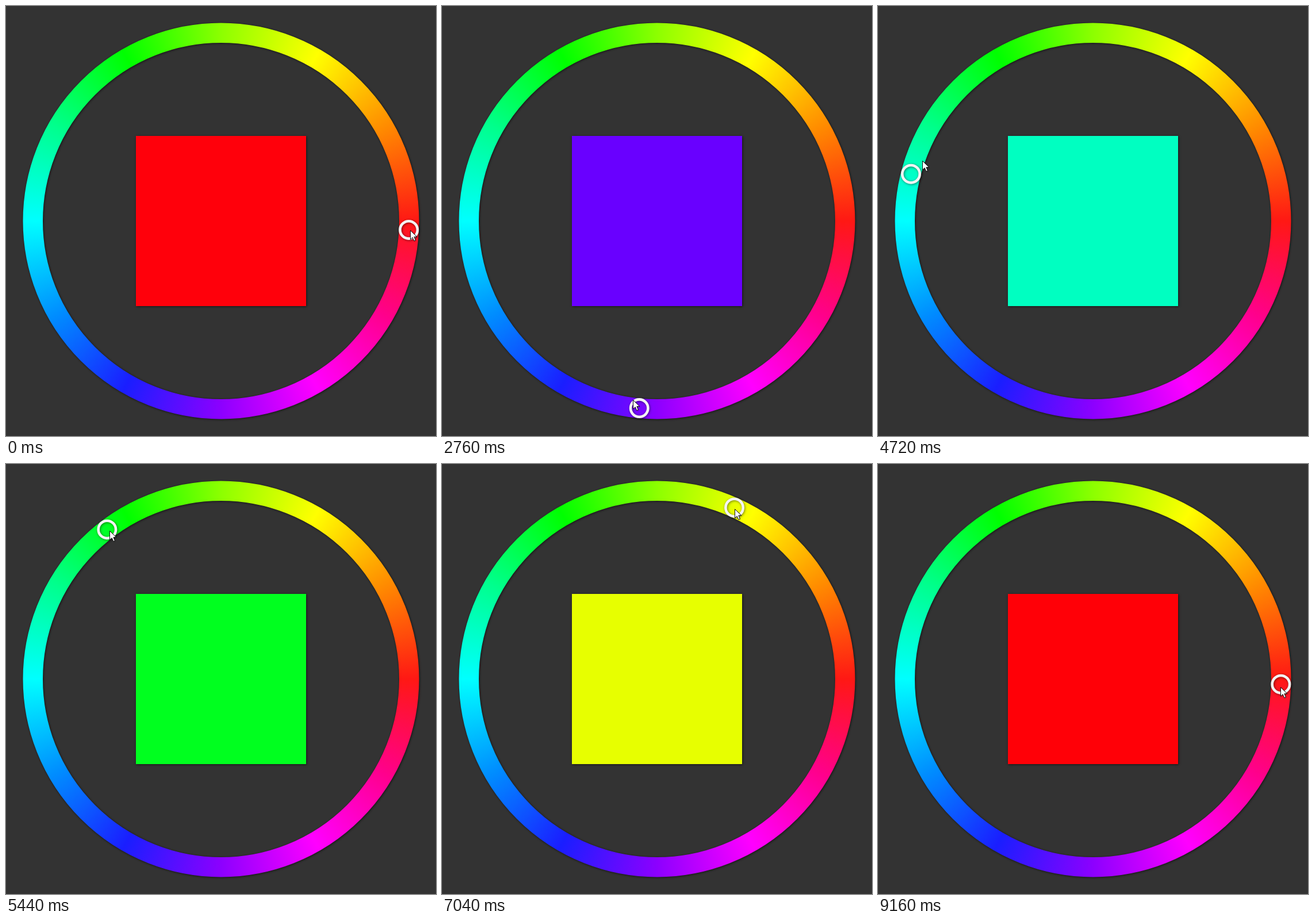
An HTML page with a canvas that plays this animation: 748x748 px, repeating every 9240 ms.

```html
<!DOCTYPE html>
<html>
<head>
<meta charset="utf-8">
<title>Hue wheel</title>
<style>
  html, body { margin: 0; height: 100%; overflow: hidden; background: #333; }
  canvas { display: block; }
</style>
</head>
<body>
<canvas id="stage" width="748" height="748"></canvas>
<script>
const ctx = document.getElementById('stage').getContext('2d');
const LOOP = 9240, CENTER = 374, RADIUS = 327, TAU = Math.PI * 2;

// Key poses of the drag: time in ms, clockwise knob angle,
// degrees the pointer leads the knob, pointer distance from center
const poses = [
  [0, 2.7, .2, 330],
  [250, -7.4, .5, 328],
  [1000, 24.6, 1, 322],
  [2040, 64.5, 1.7, 315],
  [3600, 137.7, 2.8, 316],
  [4720, 194.5, 4.9, 314],
  [5440, 232.7, .4, 321],
  [7040, 294.3, .4, 325],
  [9160, 361.6, 1, 327],
  [LOOP, 362.7, .2, 330]
];

// Smooth curve through one column of the poses
function track(column, t) {
  const last = poses.length - 1;
  const i = poses.findIndex((pose, k) => k === last - 1 || poses[k + 1][0] > t);
  const slope = k => {
    const p = poses[Math.max(k - 1, 0)], q = poses[Math.min(k + 1, last)];
    return (q[column] - p[column]) / (q[0] - p[0]);
  };
  const a = poses[i], b = poses[i + 1];
  const d = b[0] - a[0], u = (t - a[0]) / d, v = 1 - u;
  return v * v * (1 + 2 * u) * a[column] + u * u * (3 - 2 * u) * b[column]
       + d * u * v * (v * slope(i) - u * slope(i + 1));
}

// The picture advances about 15 times a second, on a 40 ms grid
function snap(t) {
  const n = Math.floor((40 * Math.floor(t / 40) + 26) / 66.53);
  return Math.max(0, 40 * Math.round((66.53 * n - 6) / 40));
}

function polar(degrees, r) {
  const a = degrees * TAU / 360;
  return [CENTER + r * Math.cos(a), CENTER + r * Math.sin(a)];
}

function shadow(alpha, blur, offset) {
  ctx.shadowColor = `rgba(0,0,0,${alpha})`;
  ctx.shadowBlur = blur;
  ctx.shadowOffsetX = ctx.shadowOffsetY = offset;
}

function ring(x, y, inner, outer, style) {
  ctx.beginPath();
  ctx.arc(x, y, (inner + outer) / 2, 0, TAU);
  ctx.lineWidth = outer - inner;
  ctx.strokeStyle = style;
  ctx.stroke();
}

// Pure hues every 60 degrees, with slightly bright blends between them
const wheel = ctx.createConicGradient(0, CENTER, CENTER);
['#ff1814', '#ff008c', '#f0f', '#8c00ff', '#1a1eff', '#008cff', '#0ff',
 '#00ff8c', '#0f0', '#8cff00', '#ff0', '#ff8c00', '#ff1814']
  .forEach((color, i) => wheel.addColorStop(i / 12, color));

const arrow = new Path2D('M.5 .5V16L4.2 12.6L6.7 18.6L9.4 17.5L6.9 11.6H11.8Z');

function drawPointer(x, y) {
  ctx.save();
  ctx.translate(Math.round(x) - 1, Math.round(y) - 1);
  shadow(.3, 2, 1);
  ctx.fillStyle = '#fff';
  ctx.fill(arrow);
  shadow(0, 0, 0);
  ctx.lineWidth = 1;
  ctx.strokeStyle = '#111';
  ctx.stroke(arrow);
  ctx.restore();
}

function draw(t) {
  const angle = track(1, t);
  shadow(0, 0, 0);
  ctx.fillStyle = '#333';
  ctx.fillRect(0, 0, 748, 748);

  shadow(.6, 4, 1);
  ring(CENTER, CENTER, 310, 344.5, wheel);
  ctx.fillStyle = `hsl(${(720 - angle) % 360}, 100%, 50%)`;
  ctx.fillRect(226, 226, 296, 296);

  shadow(.5, 4, 1);
  ring(...polar(angle, RADIUS), 12.9, 17.5, '#f4f4f4');
  drawPointer(...polar(angle + track(2, t), track(3, t)));
}

const start = performance.now();
function tick() {
  draw(snap((performance.now() - start) % LOOP));
  requestAnimationFrame(tick);
}
tick();
</script>
</body>
</html>
```
